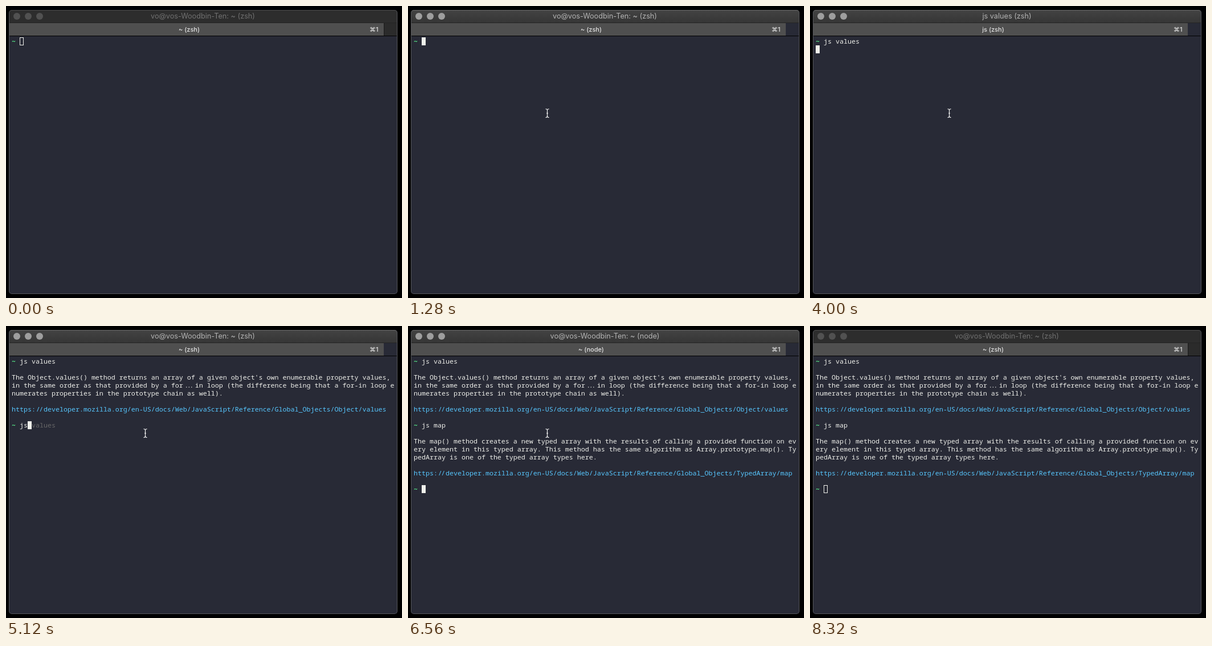
Animation, 695 px wide and 512 px high, one loop 8480 ms. Source, as an HTML page:

```html
<!DOCTYPE html>
<html lang="en">
<head>
<meta charset="utf-8">
<title>Terminal</title>
<style>
html, body { margin: 0; width: 100%; height: 100%; overflow: hidden; background: #000; }
div, pre, svg { position: absolute; margin: 0; box-sizing: border-box; }
#win { left: 5px; top: 7px; width: 682px; height: 498px; border-radius: 5px; background: #282a36; overflow: hidden; }
#edge { inset: 0; border: 1px solid #55565a; border-top-color: #6e6e6e; border-radius: 5px; }
#bar { width: 682px; height: 22px; background: linear-gradient(#434343, #363636); }
#title, #tab { text-align: center; white-space: pre; font-family: Inter, "Liberation Sans", sans-serif; }
#title { width: 681px; line-height: 22px; font-size: 12.7px; color: #b4b4b4; }
.dot { top: 5px; width: 12px; height: 12px; border-radius: 50%; background: #9e9e9e; }
#tabs { top: 22px; width: 682px; height: 24px; border: solid #000; border-width: 1px 0; border-top-color: #242424; }
#tab { width: 658px; height: 22px; padding-right: 25px; background: #4f4f4f; color: #e2e2e2; font-size: 11px; font-weight: 500; line-height: 23px; }
#key { left: 633px; }
.idle #bar { background: #2d2d2d; }
.idle #title { color: #707070; }
.idle .dot { background: #515151; }
.idle #edge { border-top-color: #505050; }
.plain #tabs { background: #2b2b2b; }
.plain #tab { border-right: 1px solid #181818; width: 659px; }
#term { left: 10px; top: 55px; color: #eff0eb; font: 500 11.667px/14px "Noto Sans Mono", "DejaVu Sans Mono", monospace; font-variant-ligatures: none; }
#term b { color: #5af78e; }
#term u { color: #57c7ff; text-decoration: none; }
#term s { color: #686868; text-decoration: none; }
.dots { letter-spacing: -2.4px; margin: 0 4.8px 0 2.4px; }
.slashes { letter-spacing: -1.5px; margin: 0 2.25px 0 .75px; }
#cursor { width: 7px; height: 14px; background: #eff0eb; }
.idle #cursor { background: none; border: 1px solid #eff0eb; }
</style>
</head>
<body>
<div id="win">
  <div id="bar"></div>
  <div class="dot" style="left:8px"></div>
  <div class="dot" style="left:28px"></div>
  <div class="dot" style="left:48px"></div>
  <div id="title"></div>
  <div id="tabs"><div id="tab"><span id="name"></span><div id="key" style="top:0">⌘1</div></div></div>
  <div id="edge"></div>
</div>
<div id="cursor"></div>
<pre id="term"></pre>
<svg id="mouse" width="9" height="18" viewBox="-4.5 -9 9 18" fill="none">
  <path id="beam" d="M-3-7.5Q0-7.5 0-5V5Q0 7.5-3 7.5M3-7.5Q0-7.5 0-5M0 5Q0 7.5 3 7.5M-1.5 0H1.5" stroke="#f4f4f4" stroke-width="1.2"/>
</svg>
<script>
const LOOP = 8480, STEP = 160;
const $ = id => document.getElementById(id);
const HOST = 'vo@vos-Woodbin-Ten: ';
const DOCS = 'https://developer.mozilla.org/en-US/docs/Web/JavaScript/Reference/Global_Objects/';

// Last entry whose start time has been reached
const at = (list, t) => list.findLast(e => e[0] <= t);

// Start, typed text, suggested text
const first = [[0, '', ''], [2080, 'j', ''], [2240, 'j', 's values'], [2560, 'js', ' values'], [3040, 'js values', '']];
const second = [[0, '', ''], [5120, 'js', ' values'], [5440, 'js ', 'values'], [5600, 'js m', ''], [5760, 'js ma', ''], [5920, 'js map', '']];
const third = [[0, '', '']];

// Start, pointer centre
const path = [[0], [640, 300, 274], [800, 264, 218], [960, 244, 188], [7200, 256, 262], [7360, 284, 417], [7520]];
const hidden = [[1440, 2080], [3520, 4000], [7360, 8000]];

const answer = (text, page) => '\n\n' + text + '\n\n<u>' + DOCS + page + '</u>\n\n';
const valuesDoc = answer(`The Object.values() method returns an array of a given object's own enumerable property values,
in the same order as that provided by a for...in loop (the difference being that a for-in loop e
numerates properties in the prototype chain as well).`, 'Object/values');
const mapDoc = answer(`The map() method creates a new typed array with the results of calling a provided function on ev
ery element in this typed array. This method has the same algorithm as Array.prototype.map(). Ty
pedArray is one of the typed array types here.`, 'TypedArray/map');

const prompt = ([, typed, ghost]) => `<b>~</b> ${typed}<s>${ghost}</s>`;
const ligate = html => html
  .replace('...', '<span class="dots">...</span>')
  .replace(/:\/\//g, ':<span class="slashes">//</span>');

const place = (el, x, y) => { el.style.left = x + 'px'; el.style.top = y + 'px'; };
const show = (el, on) => { el.style.visibility = on ? 'visible' : 'hidden'; };

let last = -1;
function draw(now) {
  const t = Math.floor(now % LOOP / STEP) * STEP;
  if (t !== last) render(last = t);
  requestAnimationFrame(draw);
}

function render(t) {
  const asked = t >= 4160, askedAgain = t >= 6560;
  const line = at(askedAgain ? third : asked ? second : first, t);
  const running = t === 4000 || t === 6400;

  let html = '';
  if (asked) html += prompt(first.at(-1)) + valuesDoc;
  if (askedAgain) html += prompt(second.at(-1)) + mapDoc;
  $('term').innerHTML = ligate(html + prompt(line));

  const row = (askedAgain ? 16 : asked ? 8 : 0) + running;
  const col = running ? 0 : 2 + line[1].length;
  place($('cursor'), 10 + 7 * col, 55 + 14 * row);
  show($('cursor'), !hidden.some(([a, b]) => t >= a && t < b));

  const shell = askedAgain && t < 7200 ? '(node)' : '(zsh)';
  $('title').textContent = running ? line[1] + ' (zsh)' : HOST + '~ ' + shell;
  $('name').textContent = (running ? 'js ' : '~ ') + shell;

  document.body.classList.toggle('idle', t < 1120 || t >= 8320);
  document.body.classList.toggle('plain', t < 1280 || t >= 8320);

  const [, x, y] = at(path, t);
  show($('mouse'), x);
  if (x) place($('mouse'), x - 4.5, y - 9);
}
requestAnimationFrame(draw);
</script>
</body>
</html>
```
